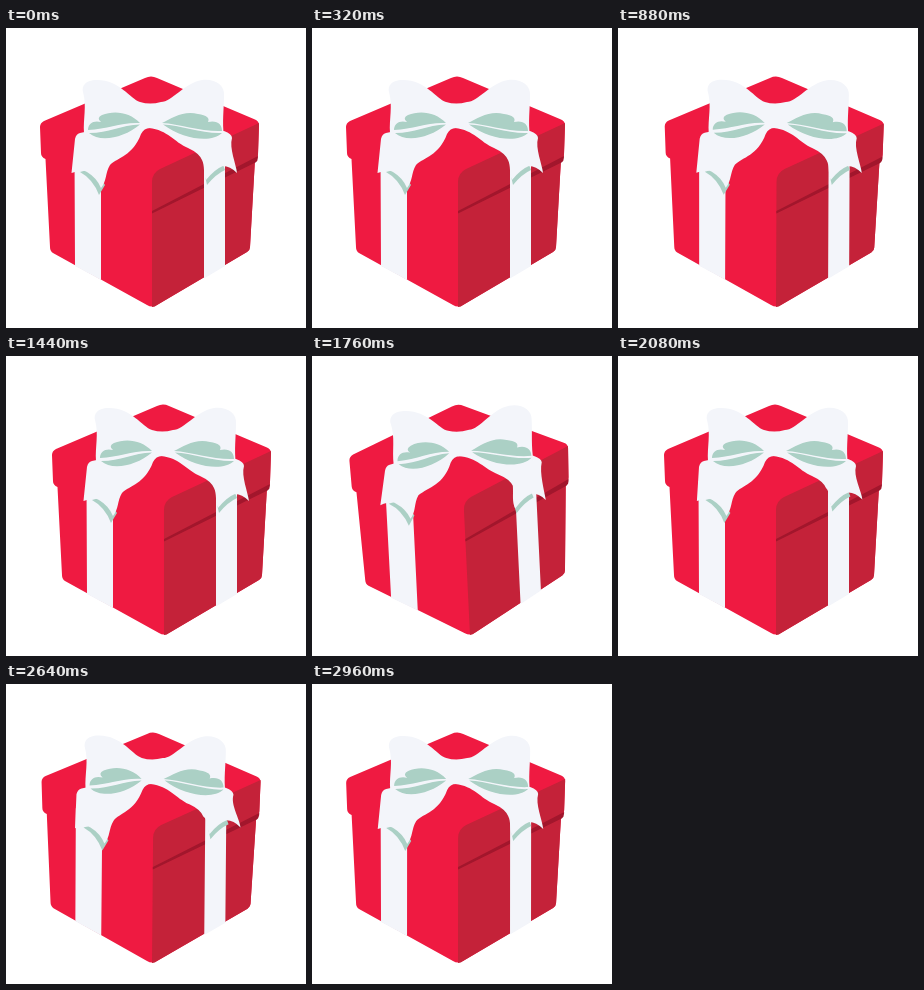
Recreate the animation shown at these times as an HTML page with a canvas. Size 300x300 px, loop 3040 ms.

```html
<!DOCTYPE html>
<html lang="en">
<head>
<meta charset="utf-8">
<title>Hopping gift</title>
<style>
  html, body { margin: 0; width: 100%; height: 100%; overflow: hidden; background: #fff; }
  canvas { display: block; width: 100vw; height: 100vh; }
</style>
</head>
<body>
<canvas id="stage" width="300" height="300"></canvas>
<script>
const ctx = document.getElementById('stage').getContext('2d');
const LOOP = 3040, STEP = 80;
const HOP_RIGHT = 320, HOP_LEFT = 2200, HOP_WIDTH = 12;
const TAKEOFF = 130, LANDING = 300;
const PIVOT = { x: 146, y: 279 };
const RED = '#ef1a41', DARK = '#c42239', SHADE = '#a2162c', WHITE = '#f3f5fa', MINT = '#abd0c5';

const { sin, exp, PI } = Math;
const clamp = v => Math.min(1, Math.max(0, v));
const easeOut = v => 1 - (1 - v) ** 2;

const airTime = age => clamp((age - TAKEOFF) / (LANDING - TAKEOFF));
const travel = age => easeOut(clamp((age - TAKEOFF) / 110));
const lift = age => 6.5 * sin(PI * airTime(age));

// Leans back before take-off, then swings forward and rings out
function hopLean(age) {
  if (age < 0) return 0;
  if (age < TAKEOFF) return -2 * sin(PI * age / TAKEOFF);
  const swing = age - TAKEOFF;
  return 7.8 * exp(-swing / 125) * sin(2 * PI * swing / 360);
}

function wobble(time) {
  const turns = clamp((time - 1200) / 720) * 1.5;
  return -3.2 * sin(2 * PI * turns);
}

const leanAt = time => hopLean(time - HOP_RIGHT) - hopLean(time - HOP_LEFT) + wobble(time);

function poseAt(time) {
  const right = time - HOP_RIGHT, left = time - HOP_LEFT;
  const lean = leanAt(time);
  return {
    x: HOP_WIDTH * (travel(right) - travel(left)),
    lift: lift(right) + lift(left),
    lean,
    drag: lean - leanAt(time - 240)
  };
}

function fill(color, path) {
  ctx.fillStyle = color;
  ctx.fill(new Path2D(path));
}

function drawBox() {
  fill(RED, `M139 50 Q145 47 151 50 L249 91.5 Q253 93 253 97 L252 126 Q252 130 249 131
    L244 219 Q244 222 241 224 L151 277 Q146 280 141 277 L47 225 Q44 223 44 219
    L39.5 131 Q35 129 35 125 L34 99 Q34 95 38 93 Z`);
  fill(DARK, `M146 154 Q146 145 154 141 L253 95 L252 126 Q252 130 249 131
    L244 219 Q244 222 241 224 L151 277 Q149 279 146 279 Z`);
  fill(SHADE, 'M146 183 L252 128 Q252 133 249.5 134.5 L146 185.5 Z');
  fill(WHITE, 'M68.5 125 H95 V252 L69 238 Z M198 125 H219 V238 L198 250.5 Z');
}

function drawTails({ lift, drag }) {
  const sag = lift * .8, sway = drag * .5;
  const left = (x, y) => `${x + sway - sag} ${y + sag}`;
  const right = (x, y) => `${x + sway - sag} ${y - sway}`;
  fill(MINT, `M${left(74, 144)} Q${left(87, 151)} ${left(93, 167)} L${left(99, 157)} L${left(88, 140)} Z`);
  fill(MINT, `M${right(199, 148)} L${right(201, 157)} Q${right(210, 146)} ${right(219, 142)}
    L${right(216, 134)} Z`);
  fill(WHITE, `M144 97 C118 98 92 101 74 105 Q70 106 69 111 L${left(65.5, 145)}
    Q${left(77, 141)} ${left(81, 144)} Q${left(91, 150)} ${left(95, 160)}
    C${left(101, 153)} ${left(99, 145)} ${left(104, 137)} C112 129 127 128 135 106 Q138 100 144 100 Z`);
  fill(WHITE, `M143 97 V100 C162 102 168 114 182 120 Q193 125 196 132
    C${right(199, 138)} ${right(197, 145)} ${right(200, 152)}
    Q${right(209, 141)} ${right(217, 138)} Q${right(224, 138)} ${right(231, 145)}
    C${right(230, 136)} 223 120 226 110 Q226 106 218 103 Z`);
}

function drawBow() {
  fill(WHITE, `M134 74 C124 71 114 52 91 52 C78 52 76 59 77 64 C81 78 77 91 78 105
    Q112 109 137 99 Q146 97 155 100 Q182 111 218 108 C216 94 218 81 218 67
    C219 57 208 50 196 52 C178 55 166 74 155 74 Q144 77 134 74 Z`);
  fill(MINT, `M82 102 C82 95 88 92 95 94 Q90 90 96 87 C108 82 124 84 134 95 C115 94 102 101 82 102 Z
    M83 105 C103 105 115 97 134 96.5 C118 110 94 115 83 105 Z`);
  fill(MINT, `M156 95 C166 90 178 82 192 86 Q205 88 202 94 C211 92 216 96 216 103 C196 104 174 96 156 95 Z
    M157 96.5 C174 97 197 106 216 105 C206 115 178 112 157 96.5 Z`);
}

function draw(time) {
  const pose = poseAt(time);
  ctx.setTransform(1, 0, 0, 1, 0, 0);
  ctx.fillStyle = '#fff';
  ctx.fillRect(0, 0, 300, 300);
  ctx.translate(PIVOT.x + pose.x, PIVOT.y - pose.lift);
  ctx.rotate(pose.lean * PI / 180);
  ctx.translate(-PIVOT.x, -PIVOT.y);
  drawBox();
  drawTails(pose);
  drawBow();
}

const start = performance.now();
function tick() {
  const time = (performance.now() - start) % LOOP;
  draw(Math.floor(time / STEP) * STEP);
  requestAnimationFrame(tick);
}
tick();
</script>
</body>
</html>
```
